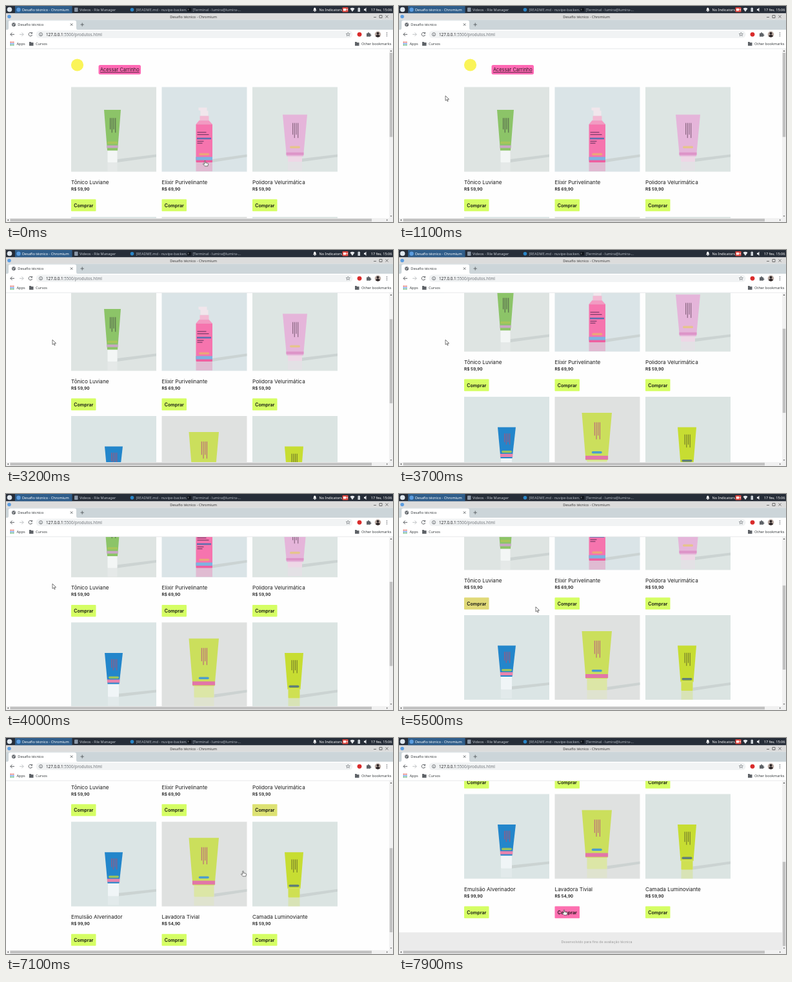
An HTML page for the animation above (8000 ms loop, 600 by 337 pixels).

```html
<!DOCTYPE html>
<html lang="pt-BR">
<head>
<meta charset="utf-8">
<title>Desafio técnico</title>
<style>
html, body { margin: 0; width: 100%; height: 100%; overflow: hidden; background: #fefefe; }
svg { display: block; width: 100vw; height: 100vh; }
.ui { font-family: 'Noto Sans', sans-serif; font-size: 5.6px; }
.page { font-family: Inter, sans-serif; fill: #1c1c1c; }
</style>
</head>
<body>
<svg id="stage" viewBox="0 0 600 337" preserveAspectRatio="none"></svg>
<script>
const LOOP = 8000, STEP = 100, ROW = 202.5;
const LIME = [213, 254, 100], PINK = [255, 105, 180];

const rect = (x, y, w, h, fill, more = '') =>
  `<rect x="${x}" y="${y}" width="${w}" height="${h}" fill="${fill}" ${more}/>`;
const disc = (x, y, r, fill) => `<circle cx="${x}" cy="${y}" r="${r}" fill="${fill}"/>`;
const shape = (d, fill, more = '') => `<path d="${d}" fill="${fill}" ${more}/>`;
const line = (d, color, width = 0.8) =>
  `<path d="${d}" fill="none" stroke="${color}" stroke-width="${width}"/>`;
const text = (x, y, str, fill, more = '') => `<text x="${x}" y="${y}" fill="${fill}" ${more}>${str}</text>`;
const blend = (a, b, k) => `rgb(${a.map((v, i) => Math.round(v + (b[i] - v) * k))})`;

// top, bottom: [left, right, y] of the body; cap: [left, right, lower y]
const products = [
  { name: 'Tônico Luviane', price: '59,90', bg: '#dee4e2', top: [51, 77, 35.5], bottom: [56, 72, 99],
    cap: [56.5, 71.5, 117.5], color: '#8cc468', capColor: '#f3f6f5', band: ['#c9a7c6', 91, 4], ink: '#4d5746', mark: ['#a8c65a', 85] },
  { name: 'Elixir Purivelinante', price: '69,90', bg: '#dae4e7', top: [53, 78.5, 58], bottom: [53, 78.5, 110],
    cap: [53, 78.5, 117.5], color: '#f674ae', capColor: '#ee5fa0', band: ['#7fb2e0', 109, 5], ink: '#7a3a68', mark: ['#eba67a', 103], pump: true },
  { name: 'Polidora Velurimática', price: '59,90', bg: '#dde5e3', top: [47, 85, 43], bottom: [53, 79, 108],
    cap: [55, 77, 116.5], color: '#e5b5da', capColor: '#eed7e6', band: ['#dd94c8', 102, 4], ink: '#76566f', mark: ['#e6c48d', 92] },
  { name: 'Emulsão Alverinador', price: '99,90', bg: '#dbe5e5', top: [52, 80, 47.5], bottom: [56.5, 74.5, 96],
    cap: [57, 74, 116], color: '#2386cb', capColor: '#f0f5f7', band: ['#e884ae', 89, 5], ink: '#b8506f', mark: ['#9bc35d', 84] },
  { name: 'Lavadora Tivial', price: '54,90', bg: '#dfe1e0', top: [42, 88.5, 25], bottom: [48, 82, 99],
    cap: [50, 81, 117], color: '#cbdf5c', capColor: '#dce6a6', band: ['#e276a8', 92, 6], ink: '#b94f83', mark: ['#4b9dce', 85] },
  { name: 'Camada Luminoviante', price: '59,90', bg: '#dbe4e2', top: [50, 79, 47.5], bottom: [54.5, 74.5, 104],
    cap: [55.5, 73.5, 118], color: '#c7dd32', capColor: '#cfe052', band: ['#d3e463', 103, 1.5], ink: '#656b28', mark: ['#5f7f78', 98] }
];

function bottle(p) {
  const [tl, tr, ty] = p.top, [bl, br, by] = p.bottom, [cl, cr, cy] = p.cap;
  const mid = (tl + tr) / 2, tall = by - ty;
  const edge = (y, side) => side[0] + (side[1] - side[0]) * (y - ty) / tall;
  const [bandColor, bandY, bandH] = p.band;
  const strip = (y, h, fill) => {
    const l = edge(y, [tl, bl]), r = edge(y, [tr, br]);
    return rect(l, y, r - l, h, fill);
  };
  let out = shape(`M${cr} ${cy - 5}L132 105V109L${cr} ${cy}Z`, '#c6cecd', 'opacity=".75"');
  out += rect(cl, cy, cr - cl, 14, p.capColor, 'opacity=".3"');
  if (p.pump) {
    out += shape('M57 32H70V37H72V45H60V37L57 36Z', '#f1e6ec') + rect(59, 45, 14, 7, '#f3bad3');
    out += shape('M58 52H73L78.5 58H53Z', '#f39ac2');
  }
  out += rect(cl, by - 1, cr - cl, cy - by + 1, p.capColor, 'rx="1"');
  out += shape(`M${tl} ${ty}H${tr}L${br} ${by}H${bl}Z`, p.color) + strip(bandY, bandH, bandColor);
  out += rect(mid - 8, p.mark[1], 16, 3.5, p.mark[0], 'rx="1.7"');
  if (p.pump) {
    [[70, 14], [73.5, 18], [84, 10], [87, 8]].forEach(([y, w]) => out += rect(55, y, w, 1.2, p.ink));
    out += rect(54.5, 79, 22, 2.5, '#5e6fae');
  } else {
    [0, 2.7, 5.4, 8.1].forEach((dx, i) =>
      out += rect(mid - 4 + dx, ty + tall * 0.2, 1.2, tall * (i % 2 ? 0.36 : 0.28), p.ink, 'opacity=".8"'));
  }
  return out;
}

const cardX = i => 101 + (i % 3) * 140.5;
const cardY = i => 126.5 + Math.floor(i / 3) * ROW;

const card = (p, i) => `<g transform="translate(${cardX(i)} ${cardY(i)})">
  ${rect(0, 0, 132, 132, p.bg)}${bottle(p)}
  ${text(0, 151.5, p.name, '#1c1c1c', 'font-size="8.2"')}
  ${text(0, 161.5, 'R$ ' + p.price, '#1c1c1c', 'font-size="6.5" font-weight="600"')}
  ${rect(0, 175, 38.5, 18.7, blend(LIME, PINK, 0), 'rx="1" class="buy"')}
  ${text(19.3, 187, 'Comprar', '#111', 'font-size="7.1" font-weight="600" text-anchor="middle"')}</g>`;

const page = `<g id="page" class="page">
  ${disc(110.5, 92, 9.6, '#faf458')}
  ${rect(143.5, 92, 65.5, 14.8, '#ff69b4', 'rx="2.5"')}
  ${text(176.3, 102, 'Acessar Carrinho', '#2b1722', 'font-size="7.4" text-anchor="middle" text-decoration="underline"')}
  ${products.map(card).join('')}
  ${rect(0, 544.8, 594, 40, '#ebebeb')}
  ${text(306.5, 561, 'Desenvolvido para fins de avaliação técnica', '#999', 'font-size="5.3" text-anchor="middle"')}</g>`;

const folder = x => shape(`M${x} 56H${x + 2.5}L${x + 3.3} 57H${x + 6.5}V62H${x}Z`, '#5f6368');
const globe = (x, y) => disc(x, y, 3, '#5f6368') + line(`M${x - 2} ${y - 1}l2 1l-1 2M${x + 1} ${y - 2}l1 2`, '#fff', 0.7);

const taskbar = rect(0, 0, 600, 11.5, '#262d38') + rect(14, 0, 88.5, 11.5, '#2f5d8a') +
  disc(5.5, 5.5, 3.8, '#dfe7ef') + disc(19.5, 5.7, 3.2, '#5b9de0') +
  text(25, 7.5, 'Desafio técnico - Chromium', '#fff') +
  rect(106, 2.5, 5.5, 6.5, '#8b98a8', 'rx=".8"') + text(114, 7.5, 'Videos - File Manager', '#c3c8cf') +
  disc(195.5, 5.7, 2.8, '#2a86c8') + text(201.5, 7.5, '[README.md - nuvipe-backen...', '#b3b9c1') +
  rect(281, 3, 6, 5.5, '#11161d') + line('M282 4.5l1.2 1l-1.2 1', '#ddd', 0.6) +
  text(289.5, 7.5, '[Terminal - lumira@lumira-...', '#b3b9c1') +
  shape('M476 7.5Q477 6.5 477 5Q477 2.5 478.7 2.5Q480.5 2.5 480.5 5Q480.5 6.5 481.5 7.5ZM478 8H479.5V9H478Z', '#fff') +
  text(485.5, 7.5, 'No Indicators', '#fff') +
  rect(521.5, 2, 9, 7.5, '#e2473f', 'rx="1"') + rect(523, 4, 4, 3.5, '#fff') + shape('M527.5 5.5L529.5 4V7.5Z', '#fff') +
  shape('M533.5 4Q537 1.5 540.5 4L537 9Z', '#e5e8ec') +
  rect(545.5, 3, 3.5, 6, '#cdd3da') + line('M547.2 1.8V3', '#cdd3da') +
  shape('M555 4.5H556.5L558.5 2.5V9L556.5 7H555Z', '#e5e8ec') +
  text(598.5, 7.5, '17 fev, 15:06', '#fff', 'text-anchor="end"');

const browser = rect(0, 11.5, 600, 10, '#dcdcdc') + disc(5, 16.5, 2.8, '#5b9de0') +
  text(290.5, 18.5, 'Desafio técnico - Chromium', '#3c3c3c', 'text-anchor="middle"') +
  line('M570 17.5h4M579 18.5v-4h4v4zM588.5 14.5l4 4m0 -4l-4 4', '#555') +
  rect(0, 21.5, 600, 15.5, '#ccd5d9') +
  shape('M2 37Q4 37 4 34V25Q4 22.5 7 22.5H106Q109 22.5 109 25V34Q109 37 111 37Z', '#fff') +
  globe(12, 29) + text(18.3, 31, 'Desafio técnico', '#3c4043') +
  line('M99.8 27.2l3.6 3.6m0 -3.6l-3.6 3.6M115.5 29h5.4m-2.7 -2.7v5.4', '#4b5054') +
  rect(0, 37, 600, 30, '#fff') +
  line('M13 44.3H7M9.6 41.5L6.8 44.3L9.6 47.1', '#4d5155', 0.9) +
  line('M21 44.3H27M24.4 41.5L27.2 44.3L24.4 47.1', '#b9bcbf', 0.9) +
  line('M40 42.3A2.8 2.8 0 1 0 40.6 45M40.5 41V43H38.5', '#4d5155', 0.9) +
  rect(46.5, 38.5, 491, 11.6, '#f1f3f4', 'rx="5.8"') +
  `<circle cx="54" cy="44.3" r="2.6" fill="none" stroke="#5f6368" stroke-width=".8"/>` + line('M54 44V46M54 42.6V43.3', '#5f6368') +
  `<text x="62" y="46.6" font-size="6.25" fill="#202124">127.0.0.1<tspan fill="#70757a">:5500/produtos.html</tspan></text>` +
  shape('M530.3 41.3l.9 2h2.2l-1.8 1.4l.7 2.2l-2 -1.3l-2 1.3l.7 -2.2l-1.8 -1.4h2.2z', 'none', 'stroke="#5f6368" stroke-width=".6"') +
  disc(548, 44.3, 3.4, '#d92b2b') +
  shape('M559 42.5h2q-.3 -1.6 1 -1.6t1 1.6h2v2q1.5 -.2 1.5 1t-1.5 1v1.3h-6z', '#5f6368') +
  disc(576.5, 44.3, 4.7, '#b9a9a1') + disc(576.5, 42.7, 1.9, '#2b2426') + shape('M572.8 47Q576.5 42.5 580.2 47Q576.5 50.6 572.8 47Z', '#2b2426') +
  [41.8, 44.3, 46.8].map(y => disc(590.5, y, 0.7, '#5f6368')).join('') +
  ['#e34b3e', '#3a7be0', '#38a457'].map((c, i) => [0, 1, 2].map(j => rect(6.5 + j * 2.2, 55.7 + i * 2.2, 1.5, 1.5, c)).join('')).join('') +
  text(16.5, 60.8, 'Apps', '#3c4043') + folder(36) + text(46, 60.8, 'Cursos', '#3c4043') +
  folder(541) + text(551, 60.8, 'Other bookmarks', '#3c4043') + rect(0, 66.5, 600, 0.6, '#dadce0');

const scrollbars = rect(594, 67, 6, 264, '#f1f1f1') + rect(0, 331, 600, 6, '#f1f1f1') +
  rect(594.8, 73, 4.4, 131.3, '#c1c1c1', 'id="thumb"') + rect(6.5, 331.8, 560.5, 4.4, '#c1c1c1') +
  shape('M595.5 71H598.5L597 69ZM4 332.5V335.5L2 334Z', '#555') +
  shape('M595.5 327H598.5L597 329ZM590 332.5V335.5L592 334Z', '#777');

const stroke = 'stroke="#222" stroke-width=".6" stroke-linejoin="round"';
const pointers = `<g id="pointer">
  ${shape('M0 0V7.6L1.8 6L3 8.8L4.3 8.2L3.1 5.5H5.5Z', '#fff', stroke + ' id="arrow"')}
  ${shape('M-.7 .4Q0 -.5 .7 .4V3.2L4.4 3.9Q5.1 4.2 5 5L4.3 8.3H-.2L-3 5.2Q-3 4.3 -2 4.5L-.7 5.3Z', '#fff', stroke + ' id="hand"')}</g>`;

document.getElementById('stage').innerHTML =
  `<clipPath id="view"><rect x="0" y="67" width="594" height="264"/></clipPath>
  ${rect(0, 0, 600, 337, '#fefefe')}<g clip-path="url(#view)">${page}</g>
  <g class="ui">${taskbar}${browser}</g>${scrollbars}${pointers}`;

// Rows: time in ms, then values
const scrollKeys = [[1600, 0], [1700, 6], [1800, 19], [1900, 23.3], [2600, 23.3], [2700, 35], [2800, 62],
  [2900, 69.6], [3100, 69.6], [3200, 70], [3300, 82], [3400, 91], [3500, 93.3], [3600, 93.3], [3700, 100],
  [3800, 112], [3900, 118], [4000, 128.6], [4100, 137], [4200, 140], [6400, 140], [6500, 147], [6600, 159],
  [6700, 163.3], [6800, 163.8], [6900, 171], [7000, 186.7], [7200, 210], [7300, 222], [7400, 233], [7500, 241.5]];
const pointerKeys = [[300, 308.5, 241.5], [400, 312, 248], [500, 288, 215], [600, 250, 170], [700, 205, 138],
  [800, 150, 121], [900, 110, 119], [1000, 84, 130], [1100, 72, 140], [4600, 72, 140], [4700, 82, 146],
  [4800, 102, 163], [5000, 121, 173], [5200, 130, 175], [5300, 150, 177], [5400, 185, 177], [5500, 212, 176],
  [5700, 252, 174], [5800, 270, 174], [6000, 345, 174], [6100, 385, 173], [6200, 396, 176], [6400, 400, 179],
  [6700, 400, 180], [6800, 400, 181], [7000, 395, 190], [7200, 340, 225], [7400, 290, 255], [7600, 262, 266], [7700, 256, 268]];
const hoverKeys = {
  0: [[4800, 0], [5200, 0.7], [5500, 0.25], [5800, 0]],
  1: [[5600, 0], [5800, 0.4], [6200, 0]],
  2: [[6000, 0], [6500, 1], [6600, 1], [6800, 0.75], [7200, 0]],
  4: [[7400, 0], [7900, 0.95]]
};

function at(keys, t) {
  const next = keys.findIndex(k => k[0] > t);
  if (next === 0) return keys[0].slice(1);
  if (next < 0) return keys[keys.length - 1].slice(1);
  const a = keys[next - 1], b = keys[next], k = (t - a[0]) / (b[0] - a[0]);
  return a.slice(1).map((v, i) => v + (b[i + 1] - v) * k);
}

const byId = id => document.getElementById(id);
const buttons = document.querySelectorAll('.buy');
const overLink = (x, y) => products.some((p, i) => {
  const dx = x - cardX(i), dy = y - cardY(i);
  return dx >= 0 && dy >= 0 && (dx < 132 && dy < 132 || dx < 38.5 && dy > 175 && dy < 193.7);
});

function draw(now) {
  const t = Math.floor(now % LOOP / STEP) * STEP;
  const [scroll] = at(scrollKeys, t), [x, y] = at(pointerKeys, t);
  const hand = overLink(x, y + scroll);
  byId('page').setAttribute('transform', `translate(0 ${-scroll})`);
  byId('thumb').setAttribute('y', 73 + scroll * 0.498);
  byId('pointer').setAttribute('transform', `translate(${x} ${y})`);
  byId('hand').style.display = hand ? '' : 'none';
  byId('arrow').style.display = hand ? 'none' : '';
  for (const i in hoverKeys) buttons[i].setAttribute('fill', blend(LIME, PINK, at(hoverKeys[i], t)[0]));
}

const start = performance.now();
function tick() {
  draw(performance.now() - start);
  requestAnimationFrame(tick);
}
tick();
</script>
</body>
</html>
```
